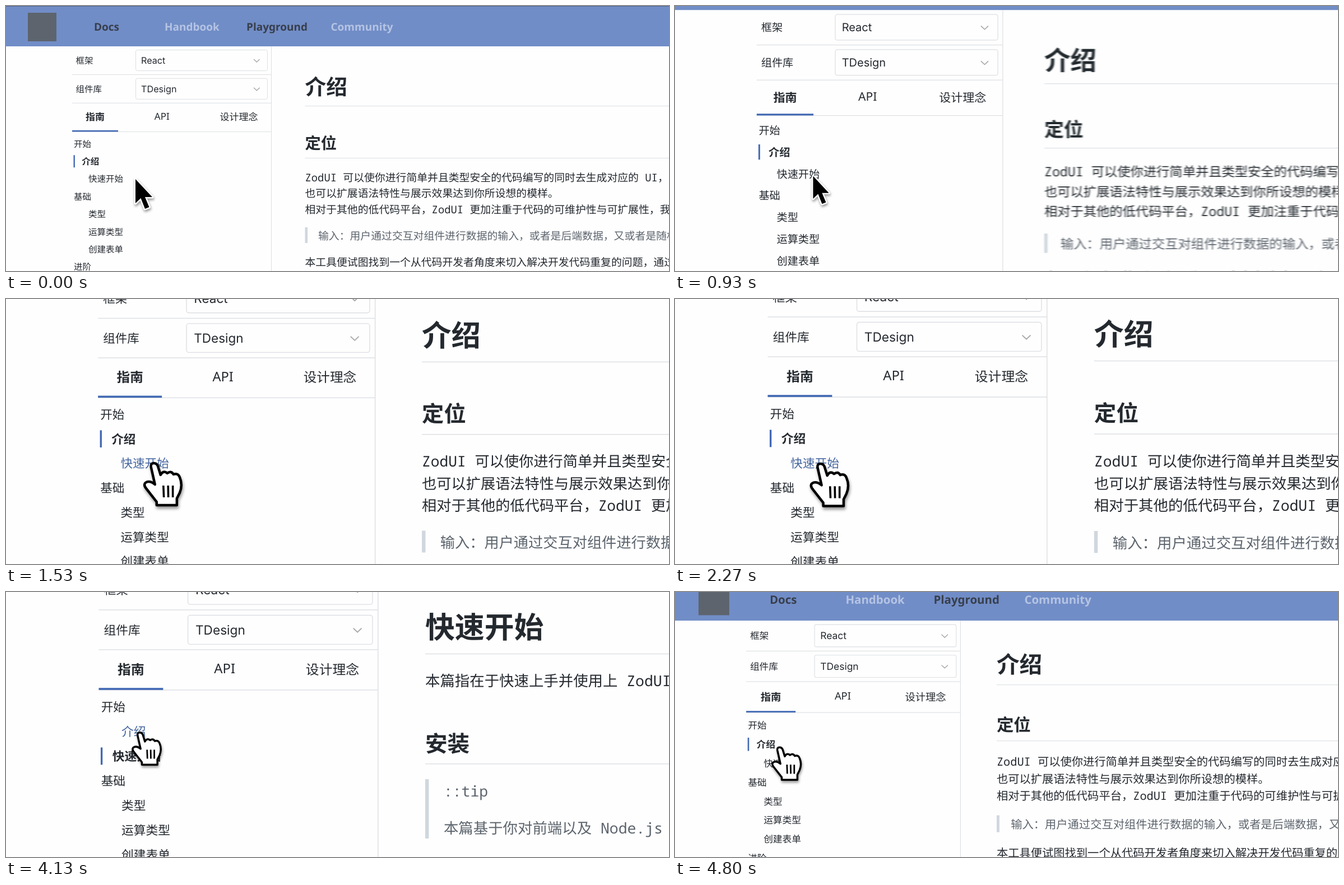
Recreate the animation shown at these times as an HTML page. Size 1183 px wide and 473 px high, loop 4.87 s.

```html
<!DOCTYPE html>
<html lang="zh-CN">
<head>
<meta charset="utf-8">
<title>ZodUI</title>
<style>
html, body { margin: 0; width: 100%; height: 100%; overflow: hidden; background: #fefefe; }
svg { display: block; width: 1183px; height: 473px; }
text { font-family: "Noto Sans", "Noto Sans CJK SC", sans-serif; text-rendering: geometricPrecision; white-space: pre; }
.doc { font-family: "Noto Sans Mono", "Noto Sans CJK SC", monospace; }
.ui { font-family: Inter, "Liberation Sans", sans-serif; }
.cursor { filter: drop-shadow(1px 3px 2px rgba(0, 0, 0, .4)); }
</style>
</head>
<body>
<svg viewBox="0 0 1183 473">
  <filter id="motion"><feGaussianBlur id="blur" stdDeviation="0 0"/></filter>
  <g id="page"></g>
</svg>
<script>
const INK = '#24292f', BLUE = '#4169b3', HOVER = '#44659f', MUTED = '#5c646d', RULE = '#dcdfe3';
const LOOP = 4870, FRAME = 1000 / 15;
const $ = id => document.getElementById(id);

// y is the vertical middle of the glyphs
const text = (str, x, y, size, { fill = INK, bold, cls = '', id = '', mid } = {}) =>
  `<text id="${id}" class="${cls}" x="${x}" y="${y + size * (/[^\x00-\x7f]/.test(str) ? .38 : .36)}"
    font-size="${size}" fill="${fill}" font-weight="${bold ? 700 : 400}"
    text-anchor="${mid ? 'middle' : 'start'}">${str}</text>`;
const rect = (x, y, w, h, fill) => `<rect x="${x}" y="${y}" width="${w}" height="${h}" fill="${fill}"/>`;
const rule = (x, y, w) => rect(x, y, w, 1, RULE);

const nav = (str, x, active) => text(str, x, 37.5, 19, { bold: true, fill: active ? '#383f4c' : '#b5c4e3' });
const select = (label, value, y) => text(label, 124.5, y, 15.5) +
  `<rect x="231.5" y="${y - 18.5}" width="235" height="37" rx="3" fill="none" stroke="${RULE}"/>
   <path d="M442 ${y - 2}l5.3 5 5.3 -5" fill="none" stroke="#a6a6a6" stroke-width="1.3"/>` +
  text(value, 241, y, 16.2, { cls: 'ui' });

const rowY = i => 245.8 + i * 31.4;
const group = (str, i) => text(str, 121, rowY(i), 15.5);
const link = (str, i, id) => text(str, 147, rowY(i), 15.5, { id });
const activeLink = (str, i) => rect(120.5, rowY(i) - 11, 2.4, 22, BLUE) +
  text(str, 135.3, rowY(i), 15.5, { bold: true });

const EM = 18.85;
const para = (str, y) => text(str, 533.5, y, EM, { cls: 'doc' });
const quote = (str, y) => text(str, 557, y, EM, { cls: 'doc', fill: MUTED });
const heading = (str, y, ems, lineY) => text(str, 533.5, y, EM * ems, { bold: true }) + rule(533.5, lineY, 660);

const header = rect(0, 0, 1183, 72, '#718dc7') + rect(0, 0, 1183, 1, '#52658f') +
  rect(39, 12, 51, 51, '#5d646d') +
  nav('Docs', 157, true) + nav('Handbook', 283) + nav('Playground', 429, true) + nav('Community', 579.5);

const sidebar = select('框架', 'React', 97) + select('组件库', 'TDesign', 147.8) +
  rule(118, 122, 355) + rule(118, 172.7, 355) + rule(118, 224, 355) + rect(473, 72, 1, 420, RULE) +
  rect(118, 221.8, 82, 2.6, BLUE) +
  text('指南', 159, 198, 17, { bold: true, mid: true }) + text('API', 278.3, 197, 17, { mid: true }) +
  text('设计理念', 415.5, 198, 17, { mid: true }) +
  group('开始', 0) + group('基础', 3) + link('类型', 4) + link('运算类型', 5) +
  link('创建表单', 6) + group('进阶', 7);

const introNav = activeLink('介绍', 1) + link('快速开始', 2, 'toQuick');
const introDoc = heading('介绍', 143.8, 2, 178) + heading('定位', 244.5, 1.5, 271) +
  para('ZodUI 可以使你进行简单并且类型安全的代码编写的同时去生成对应的 UI，', 305.5) +
  para('也可以扩展语法特性与展示效果达到你所设想的模样。', 334) +
  para('相对于其他的低代码平台，ZodUI 更加注重于代码的可维护性与可扩展性，我们', 362.5) +
  rect(533.5, 395, 4.6, 28, '#d0d7de') +
  quote('输入：用户通过交互对组件进行数据的输入，或者是后端数据，又或者是随机', 409.7) +
  para('本工具便试图找到一个从代码开发者角度来切入解决开发代码重复的问题，通过', 457);

const quickNav = link('介绍', 1, 'toIntro') + activeLink('快速开始', 2);
const quickDoc = heading('快速开始', 143.8, 2, 178) + para('本篇指在于快速上手并使用上 ZodUI', 212.5) +
  heading('安装', 292.5, 1.5, 318) + rect(533.5, 338, 4.6, 75.5, '#d0d7de') +
  quote('::tip', 353) + quote('本篇基于你对前端以及 Node.js 的', 400);

const arrow = `<path d="M0 0V43L9.5 34 17 53 24.5 50 17 32H30Z" stroke="#fff" stroke-width="5"
  stroke-linejoin="round" paint-order="stroke"/>`;
const hand = `<g transform="scale(.72) translate(-2.5 0)" stroke="#000" stroke-width="4.5"
    stroke-linejoin="round" stroke-linecap="round">
  <path fill="#fff" d="M-3 8Q-4 1 2 1 7 1 9 6L14 22Q19 13 26 19 33 14 37 21 45 18 48 26 54 40 48 54
    L43 64V76H7V70L-11 47Q-17 40 -13 36 -6 31 4 39Z"/>
  <path stroke-width="3.6" stroke-linecap="butt" d="M19 41l.8 21M27.4 41l.4 21M35.8 41v21"/></g>`;

const view = (id, nav, doc) => `<g id="${id}">${nav}<g class="body">${doc}</g></g>`;
$('page').innerHTML = header + sidebar + view('intro', introNav, introDoc) + view('quick', quickNav, quickDoc) +
  `<g class="cursor" id="cursor"><g id="arrow">${arrow}</g><g id="hand">${hand}</g></g>`;
const bodies = document.querySelectorAll('.body');

// time, x, y of the pointer on the page
const track = [[0, 231, 309], [930, 199.5, 312], [1530, 190, 307.6], [2270, 185.5, 308.6],
  [3330, 189.7, 304.4], [4130, 170.5, 278], [4800, 173.8, 281.4], [LOOP, 173.8, 281.4]];
function pointer(t) {
  const i = track.findIndex(k => k[0] > t), [t0, x0, y0] = track[i - 1], [t1, x1, y1] = track[i];
  const e = (1 - Math.cos(Math.PI * (t - t0) / (t1 - t0))) / 2;
  return [x0 + (x1 - x0) * e, y0 + (y1 - y0) * e];
}

// critically damped spring from 0 to 1
function spring(ms) {
  const p = Math.max(0, ms) * .00583;
  return 1 - (1 + p) * Math.exp(-p);
}
const zoomAt = t => 1 + .402 * (spring(t - 596) - spring(t - 4273));
const press = (t, at) => .24 * Math.exp(-(((t - at) / 100) ** 2));
const show = (id, on) => $(id).setAttribute('display', on ? 'inline' : 'none');

function draw(t) {
  const zoom = zoomAt(t);
  $('page').setAttribute('transform', `translate(0 ${347.7 * (1 - zoom)}) scale(${zoom})`);

  // sideways motion blur of the document while zooming
  const blur = Math.abs(zoomAt(t + 5) - zoomAt(t - 5)) * 190;
  $('blur').setAttribute('stdDeviation', `${blur} 0`);
  bodies.forEach(b => b.setAttribute('filter', blur > .1 ? 'url(#motion)' : 'none'));

  const onQuick = t > 2900 && t < 4180, isHand = t > 1100;
  const [x, y] = pointer(t);
  show('intro', !onQuick);
  show('quick', onQuick);
  show('arrow', !isHand);
  show('hand', isHand);
  $('toQuick').setAttribute('fill', isHand && y > 293 ? HOVER : INK);
  $('toIntro').setAttribute('fill', y < 293 ? HOVER : INK);

  const size = 1 - press(t, 930) - press(t, 2830) - press(t, 4130);
  $('cursor').setAttribute('transform', `translate(${x} ${y}) scale(${size})`);
}

const start = performance.now();
function tick() {
  const t = (performance.now() - start) % LOOP;
  draw(Math.min(72, Math.floor((t + 5) / FRAME)) * FRAME);
  requestAnimationFrame(tick);
}
tick();
</script>
</body>
</html>
```
